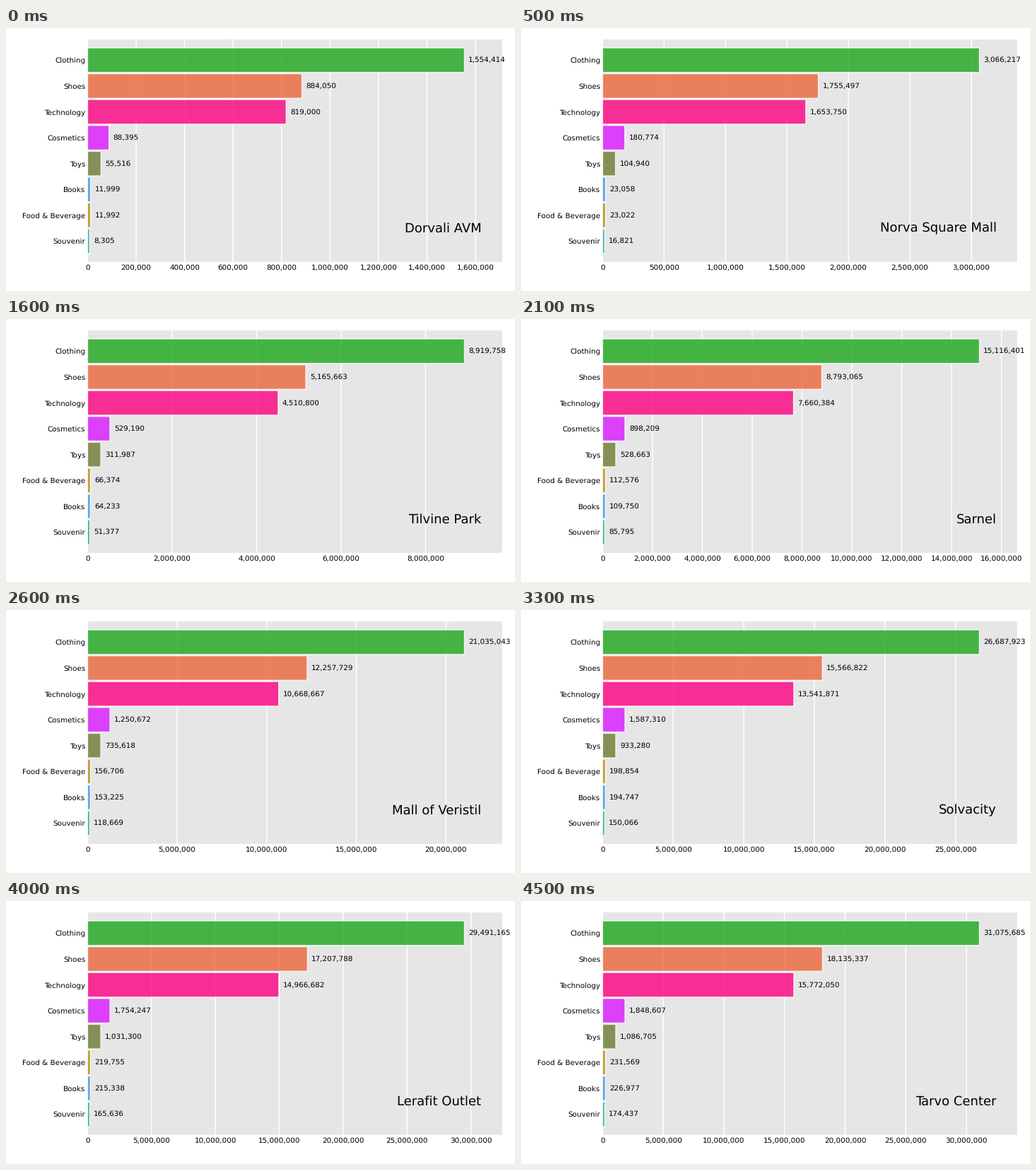
Recreate the animation shown at these times as a matplotlib script. Size 720 px wide and 372 px high, loop 4.6 s.

```python
import numpy as np
import matplotlib.pyplot as plt
from matplotlib.animation import FuncAnimation
from matplotlib.ticker import MaxNLocator, StrMethodFormatter

W, H, DPI = 720, 372, 100
PX = 72 / DPI                 # points per pixel
STEPS, FRAMES = 5, 46
LEFT, RIGHT, TOP, BOTTOM = 115.4, 701.8, 16.2, 330.8
TEXT, TITLE, LINE = 10.4 * PX, 18 * PX, 1.5 * PX

plt.rcParams.update({"font.family": "DejaVu Sans", "text.hinting": "none"})

# Malls in running order with their number of sales
MALLS = {
    "Dorvali AVM": 4991, "Norva Square Mall": 4811, "Galen Vadelin": 4947,
    "Tilvine Park": 9781, "Sarnel": 19823, "Mall of Veristil": 19943,
    "Solvacity": 15011, "Narvelin AVM": 10161, "Lerafit Outlet": 4914,
    "Tarvo Center": 5075,
}
# Colour of each category and its running total at the key steps
KEY_STEPS = [0, 5, 16, 45]
CATEGORIES = {
    "Clothing": ("#1CA71C", 1554414, 3066217, 8919758, 31075685),
    "Shoes": ("#EB663B", 884050, 1755497, 5165663, 18135337),
    "Technology": ("#FC0080", 819000, 1653750, 4510800, 15772050),
    "Cosmetics": ("#DA16FF", 88395, 180774, 529190, 1848607),
    "Toys": ("#6C7C32", 55516, 104940, 311987, 1086705),
    "Books": ("#2E91E5", 11999, 23058, 64233, 226977),
    "Food & Beverage": ("#B68100", 11992, 23022, 66374, 231569),
    "Souvenir": ("#00A08B", 8305, 16821, 51377, 174437),
}
names = list(CATEGORIES)
titles = list(MALLS)

# Totals grow with the sales count, which rises evenly within each mall
step = np.arange(FRAMES)
mall_step = np.arange(len(MALLS)) * STEPS
sold = np.interp(step, mall_step, np.cumsum(list(MALLS.values())))
values = np.column_stack([np.interp(sold, sold[KEY_STEPS], totals)
                          for _, *totals in CATEGORIES.values()])

# Places trail the totals by one mall and glide between malls
ranks = values[::STEPS].argsort(axis=1).argsort(axis=1) + 1
ranks = np.vstack([ranks[:1], ranks[:-1]])
places = np.column_stack([np.interp(step, mall_step, r) for r in ranks.T])

fig = plt.figure(figsize=(W / DPI, H / DPI), dpi=DPI, facecolor="white")
ax = fig.add_axes([LEFT / W, 1 - BOTTOM / H, (RIGHT - LEFT) / W, (BOTTOM - TOP) / H],
                  facecolor="0.9")
ax.patch.set_snap(False)
ax.set_ylim(0.2, len(names) + 0.8)
ax.set_axisbelow(True)
ax.grid(True, axis="x", color="white", lw=LINE, snap=False)
ax.tick_params(length=0, labelsize=TEXT, pad=3 * PX)
ax.xaxis.set_major_locator(MaxNLocator(9, steps=[1, 2, 2.5, 5, 10]))
ax.xaxis.set_major_formatter(StrMethodFormatter("{x:,.0f}"))
ax.spines[:].set_visible(False)

bars = ax.barh(places[0], values[0], height=0.95, alpha=0.8, ec="white", lw=LINE,
               color=[c for c, *_ in CATEGORIES.values()], snap=False)
labels = [ax.text(0, 0, "", ha="left", va="center", size=TEXT) for _ in names]
title = ax.text(0.95, 0.15, "", transform=ax.transAxes, ha="right", va="center",
                size=TITLE)


def draw(i):
    limit = values[i].max() * 1.1
    ax.set_xlim(0, limit)
    ax.set_yticks(places[i], names)
    for bar, label, value, y in zip(bars, labels, values[i], places[i]):
        bar.set_width(value)
        bar.set_y(y - bar.get_height() / 2)
        label.set_position((value + 0.01 * limit, y))
        label.set_text(f"{value:,.0f}")
    title.set_text(titles[i // STEPS])
    return [*bars, *labels, title]


anim = FuncAnimation(fig, draw, frames=FRAMES, interval=100, repeat=True,
                     repeat_delay=0, blit=False)
plt.show()
```
